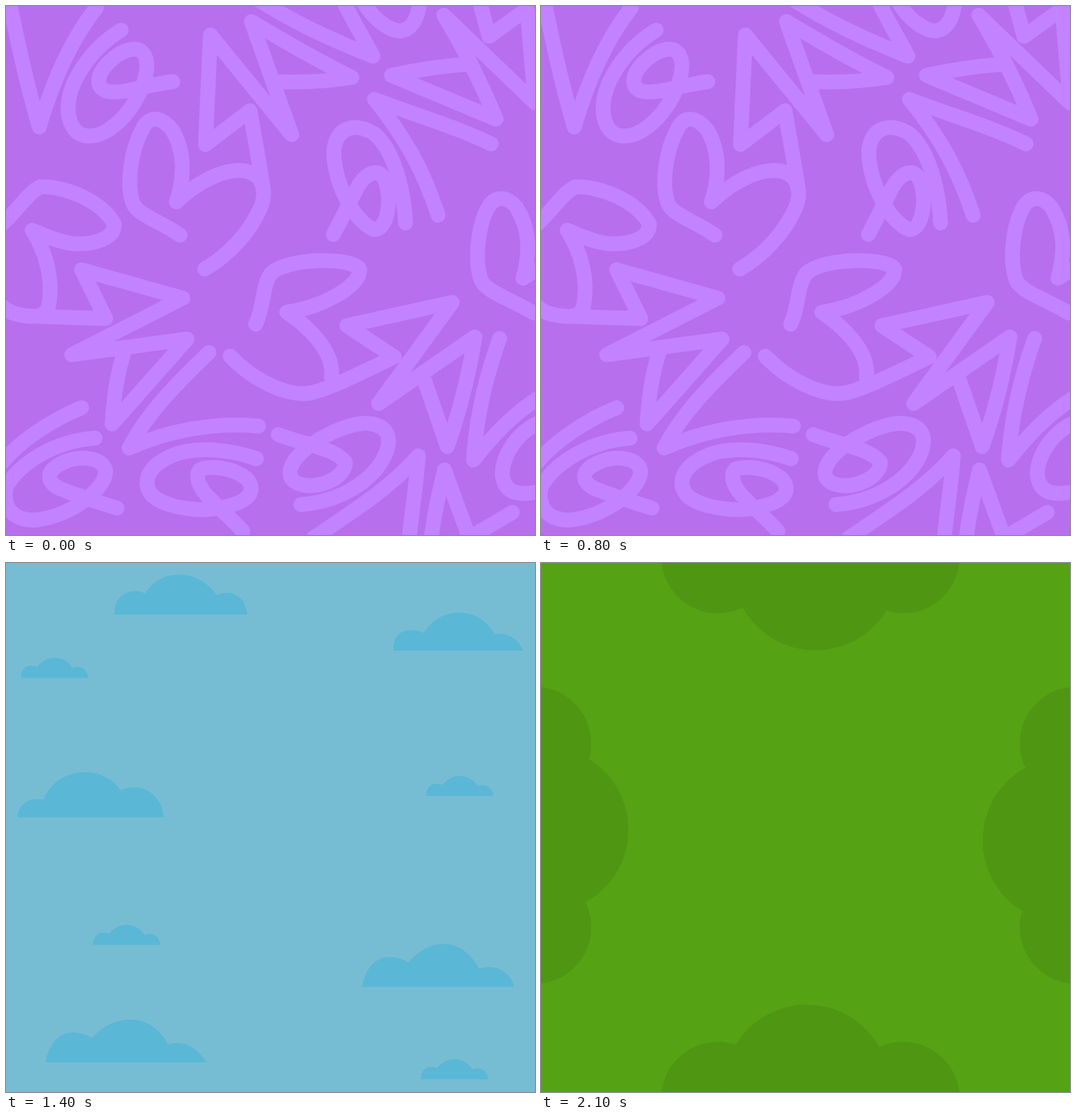
Recreate the animation shown at these times as an HTML page. Size 748 px wide and 748 px high, loop 2200 ms.

```html
<!DOCTYPE html>
<html lang="en">
<head>
<meta charset="utf-8">
<title>Flickering backdrops</title>
<style>
  html, body { margin: 0; width: 100%; height: 100%; overflow: hidden; background: #b76fee; }
  svg { display: block; width: 100vw; height: 100vh; }
  .scene { visibility: hidden; }
  .scene.on { visibility: visible; }
  .line path { fill: none; stroke-linecap: round; stroke-linejoin: round; }
  #letters path { stroke: #c382ff; stroke-width: 21; }
  #loops path { stroke: #748fff; stroke-width: 14; }
  #spots ellipse { fill: #eddf00; }
  #clouds { fill: #5bb7d6; }
  #stripes path { stroke: #f09bc1; stroke-width: 46.75; }
  #bushes circle { fill: #4f9612; }
</style>
</head>
<body>
<svg viewBox="0 0 748 748">
  <defs>
    <rect id="bg" width="748" height="748"/>
    <path id="puff" d="M0 0C0-17 14-20 23-15.5C36-33 61-33 73-14C85-19 95-11 95 0Z"/>
  </defs>

  <g id="letters" class="scene line on">
    <use href="#bg" fill="#b76fee"/>
    <!-- top left -->
    <path d="M4-10C18 60 32 120 47 171C65 110 90 50 128 2"/>
    <path d="M163 34C120 60 85 110 88 150C92 185 115 190 140 178C180 155 205 100 198 75C192 52 165 60 145 80C125 100 128 118 145 121C170 124 195 112 236 107"/>
    <path d="M246 324C220 305 187 296 180 280C170 255 175 205 195 170C205 155 220 157 235 175C250 200 255 235 241 277C275 245 310 230 338 233C362 238 370 260 360 285C345 320 315 352 281 372"/>
    <path d="M364 262C360 230 352 190 345 148L282 196L289 41L404 182L347 22Q430 72 489 101Q440 109 388 107"/>
    <path d="M358-8C410 25 465 50 519 71C505 45 490 20 478-5"/>
    <path d="M506-5C520 20 545 37 560 35C575 32 583 15 585-5"/>
    <!-- top right -->
    <path d="M655 82Q600 86 545 98L693 160Q660 80 619 13L748 137L737 4L683 43L670-5"/>
    <path d="M686 195C635 170 580 155 521 132C560 180 590 230 611 296"/>
    <path d="M565 307C562 250 545 200 520 180C495 165 470 170 464 200C460 235 485 300 520 316C540 318 547 270 535 245C525 225 505 240 495 260C485 280 475 300 463 323"/>
    <path d="M746 434C715 415 680 405 672 388C660 355 670 300 685 280C695 268 710 270 722 285C740 315 742 345 731 385L754 370"/>
    <!-- left -->
    <path d="M-5 308C20 285 30 265 48 256C80 253 135 275 153 308C155 330 120 338 95 336C70 333 50 322 37 317C55 345 68 385 60 425Q56 437 45 438"/>
    <path d="M-5 425C5 435 20 439 45 439L141 442L107 373L250 413L93 493L256 471L150 591C152 555 157 520 167 490"/>
    <path d="M287 490C240 535 200 575 174 625C230 600 295 588 357 594"/>
    <path d="M107 568C65 585 20 615-5 645"/>
    <path d="M126 611C70 615 20 645 0 680C-5 710 10 727 40 727C90 722 140 685 141 658C138 638 105 635 82 645C55 657 57 672 75 682C95 690 125 700 157 710"/>
    <path d="M354 640C310 625 270 625 245 632C205 645 190 670 205 690C220 708 275 718 310 708C345 700 355 685 340 668C320 652 290 650 275 655C265 665 275 685 290 698C305 715 320 725 335 743"/>
    <!-- centre and bottom right -->
    <path d="M353 450C365 425 362 395 375 378C400 355 490 355 500 372C502 395 450 425 397 433C430 455 465 490 460 525"/>
    <path d="M317 495C345 525 390 550 425 548C450 545 500 520 549 496L482 452L631 419L527 562L663 468Q650 550 624 623L592 530"/>
    <path d="M698 470C680 520 665 580 661 642C690 605 720 575 752 555"/>
    <path d="M752 590C720 605 700 640 702 665C706 690 725 692 752 687"/>
    <path d="M385 606C420 620 465 625 480 645C480 665 450 680 425 678C400 675 395 660 410 640C430 615 480 590 510 590C540 592 545 610 538 630C525 665 480 700 417 705"/>
    <path d="M435 752C490 715 545 680 583 636C580 680 573 720 570 755"/>
    <path d="M601 755C605 720 612 690 620 656L655 752L716 716"/>
  </g>

  <g id="loops" class="scene line">
    <use href="#bg" fill="#6b86f2"/>
    <path d="M138-5C130 60 150 150 185 188C215 215 255 228 330 226C470 222 640 205 755 160"/>
    <path d="M207-5C240 70 265 150 290 200C320 260 380 300 425 365C455 410 460 460 455 485C435 590 350 640 260 626C210 615 180 595 190 570C205 530 290 505 340 478C420 435 500 375 503 300C503 265 485 248 470 253C455 260 460 280 475 288C530 325 620 410 660 495C680 540 675 590 645 620C600 665 520 685 400 703C280 720 120 722-5 697"/>
    <path d="M235-5C225 90 160 250 100 330C60 385 25 420-5 414"/>
    <path d="M-5 365C15 300 80 245 160 235C215 228 255 222 300 180C345 140 365 85 360 45C355 10 330-5 305 5C270 20 250 60 257 100C262 150 310 182 370 180C430 178 490 155 525 120C560 85 568 40 560-5"/>
    <path d="M755 33C712 10 655 8 610 28C550 55 518 105 520 155C523 205 555 250 610 268C655 280 705 277 755 263"/>
    <path d="M755 208C690 320 665 440 658 530C655 600 660 680 686 755"/>
    <path d="M-5 542C70 475 200 452 305 451C430 452 520 500 545 565C565 620 560 700 525 752"/>
    <path d="M378 755C405 640 490 555 570 535C640 518 705 535 755 580"/>
  </g>

  <g id="spots" class="scene"><use href="#bg" fill="#fff000"/></g>

  <g id="sky" class="scene"><use href="#bg" fill="#78b6e5"/></g>

  <g id="clouds" class="scene">
    <use href="#bg" fill="#76bdd4"/>
    <use href="#puff" x="21" y="162.5"/>
    <use href="#puff" x="594" y="329.5"/>
    <use href="#puff" x="123" y="540"/>
    <use href="#puff" x="586.5" y="730"/>
    <path transform="translate(153.5 73)" d="M0 0C-2-30 25-39 43-30C65-66 118-66 144-28C170-38 186-22 187.5 0Z"/>
    <path transform="translate(548 124)" d="M0 0C-2-27 20-35 43-25C65-64 122-64 143-23C162-28 179-14 183 0Z"/>
    <path transform="translate(16 359.5)" d="M0 0C2-22 20-28 37-25C55-71 120-77 146-38C175-52 205-32 207 0Z"/>
    <path transform="translate(503 599.5)" d="M0 0C8-40 34-52 66-35C98-72 143-70 166-26C190-33 209-23 216 0Z"/>
    <path transform="translate(56 706)" d="M0 0C8-42 34-50 66-35C97-71 152-70 173-25C194-33 216-20 227 0Z"/>
  </g>

  <g id="stripes" class="scene">
    <use href="#bg" fill="#f291bb"/>
    <path d="M374 0V748" style="stroke-width:748;stroke-dasharray:46.75;stroke-dashoffset:46.75"/>
  </g>

  <g id="bushes" class="scene">
    <use href="#bg" fill="#55a214"/>
    <circle cx="250" cy="-9" r="80"/><circle cx="512" cy="-9" r="80"/><circle cx="388" cy="6" r="117.5"/>
    <circle cx="-9" cy="255" r="80"/><circle cx="-9" cy="515" r="80"/><circle cx="6" cy="377" r="117.5"/>
    <circle cx="757" cy="255" r="80"/><circle cx="757" cy="515" r="80"/><circle cx="742" cy="392" r="117.5"/>
    <circle cx="250" cy="757" r="80"/><circle cx="512" cy="757" r="80"/><circle cx="376" cy="742" r="117.5"/>
  </g>
</svg>
<script>
  const STEP = 100;
  const byId = id => document.getElementById(id);

  // Spots: radii, then the centres that share them.
  const spots = [
    [115.5, 21.3, [[299, 29.5], [747.5, -2], [629, 248], [165.5, 335], [11, 401], [499, 530.5],
                   [82.5, 633], [710.5, 685], [573.5, 749.5]]],
    [122.5, 20, [[280.5, 207.5]]],
    [145.5, 26.5, [[574, 66], [91.5, 260]]],
    [147.5, 30.6, [[-7, 8], [528, 163.5], [710.5, 462.5], [719, 581]]],
    [188.3, 39.8, [[186, 116], [551, 335], [335, 448.5], [70, 541.5], [414, 633], [223, 749.5]]]
  ];
  for (const [rx, ry, centres] of spots) {
    for (const [cx, cy] of centres) {
      const spot = document.createElementNS("http://www.w3.org/2000/svg", "ellipse");
      for (const [key, value] of Object.entries({ cx, cy, rx, ry })) spot.setAttribute(key, value);
      byId("spots").append(spot);
    }
  }

  // One letter per step, hard cuts only.
  const scenes = { P: "letters", S: "loops", Y: "spots", B: "sky", C: "clouds", K: "stripes", G: "bushes" };
  const order = "PYKBSGYCPKBYSGCPBYKSCG";
  let shown = byId("letters");

  function draw(now) {
    const step = Math.floor(now / STEP) % order.length;
    const next = byId(scenes[order[step]]);
    if (next !== shown) {
      shown.classList.remove("on");
      next.classList.add("on");
      shown = next;
    }
    requestAnimationFrame(() => draw(performance.now()));
  }
  draw(performance.now());
</script>
</body>
</html>
```
